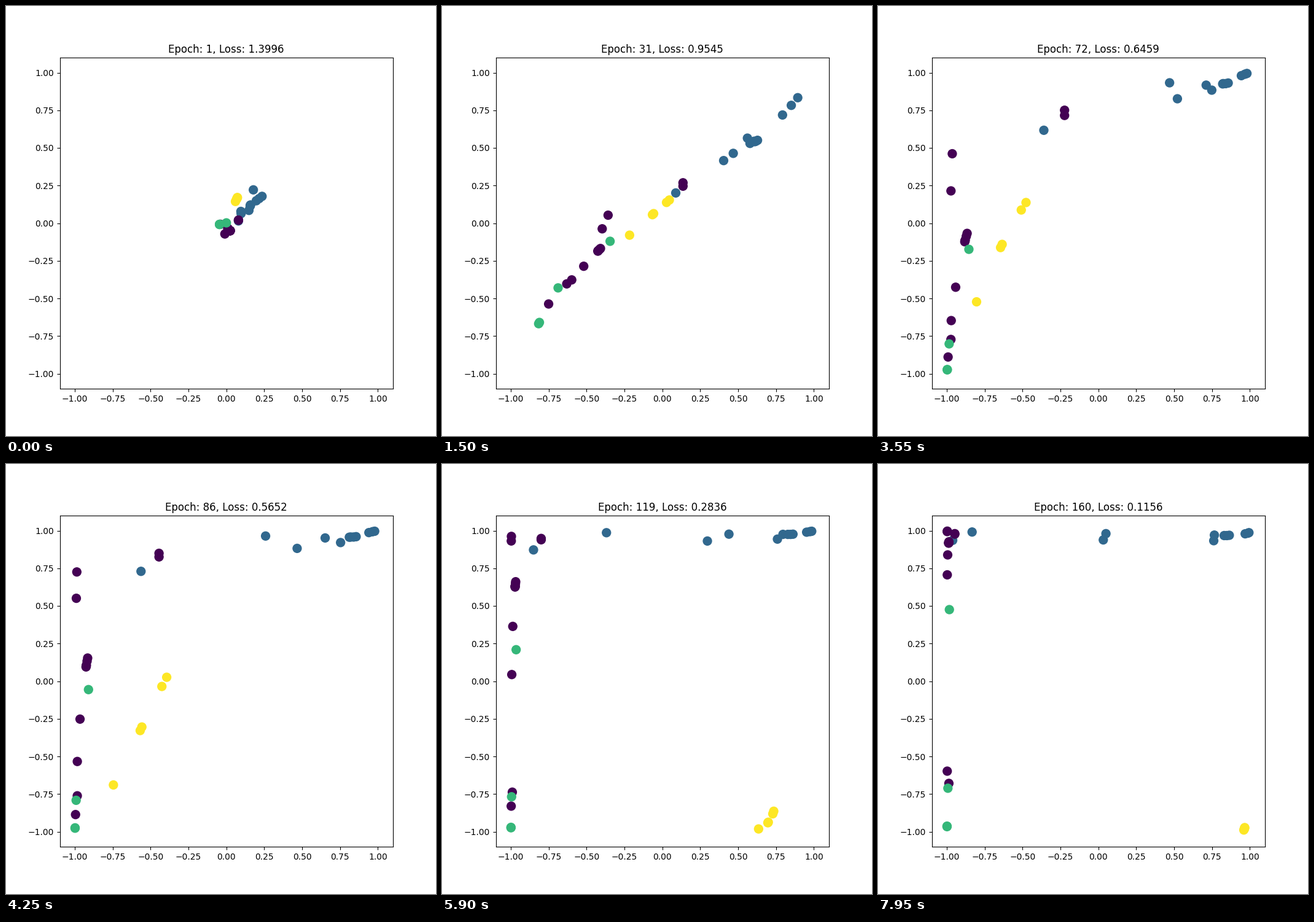
Write a matplotlib script that moves like this. It is 700 by 700 pixels and loops after 8000 ms.

```python
import numpy as np
import matplotlib.pyplot as plt
from matplotlib.animation import FuncAnimation

COUNT, STEP_MS = 160, 50
COLORS = {"yellow": "#fde725", "blue": "#31688e", "purple": "#440154", "green": "#35b779"}

LOSS_EPOCHS = (1, 31, 51, 72, 99, 119, 160)
LOSS = np.array([1.3996, 0.9545, 0.7767, 0.6459, 0.4769, 0.2836, 0.1156])

# Leading nodes: (x, y) before the tanh at a few key epochs.
# All other nodes follow from these.
KEY_EPOCHS = (1, 31, 51, 99, 160)
LEADERS = {
    "far": [(0.24, 0.18), (1.44, 1.2), (2.12, 2.33), (2.28, 3.2), (2.9, 2.5)],
    "mid": [(0.16, 0.12), (0.72, 0.61), (1.09, 1.14), (1.22, 2.1), (1.25, 2.05)],
    "near": [(0.15, 0.085), (0.66, 0.59), (0.9, 1.09), (0.67, 2.05), (0.05, 2.3)],
    "leaf": [(0.18, 0.225), (0.635, 0.64), (0.71, 1.15), (0.03, 2.25), (-1.2, 2.7)],
    "bridge": [(0.08, 0.02), (0.137, 0.275), (0.046, 0.58), (-0.71, 1.49), (-1.81, 2.3)],
    "climb": [(0.01, -0.035), (-0.375, 0.053), (-1.165, 0.088), (-2.9, 1.31), (-3.3, 3.2)],
    "core": [(0.025, -0.05), (-0.434, -0.17), (-0.9, -0.244), (-1.77, 0.376), (-2.5, 1.63)],
    "low": [(-0.01, -0.072), (-0.975, -0.6), (-2.03, -1.19), (-3.3, -1.36), (-3.4, -0.69)],
    "side": [(-0.045, -0.008), (-0.845, -0.46), (-1.77, -0.944), (-2.95, -1.05), (-2.85, -0.89)],
    "loner": [(0, 0.002), (-0.36, -0.121), (-0.837, -0.243), (-1.74, 0.05), (-2.4, 0.517)],
}

# The yellow pair turns sharply, so it has its own key epochs
TURN_EPOCHS = (1, 31, 72, 99, 119, 160)
TURNERS = {
    "outer": [(0.06, 0.145), (-0.22, -0.08), (-1.11, -0.58), (-0.55, -1.245),
              (0.75, -2.35), (1.95, -2.6)],
    "inner": [(0.073, 0.172), (0.046, 0.155), (-0.52, 0.138), (-0.105, -0.26),
              (0.94, -1.31), (2.03, -2.15)],
}


def spline(epochs, keys, epoch):
    """Cubic Hermite curve through keys, with gentler ends."""
    keys = np.asarray(keys, float)
    slopes = np.gradient(keys, epochs, axis=0)
    slopes[0] *= 0.3
    slopes[-1] *= 0.5
    i = min(np.searchsorted(epochs, epoch, side="right"), len(epochs) - 1) - 1
    span = epochs[i + 1] - epochs[i]
    s = (epoch - epochs[i]) / span
    rise = s * s * (3 - 2 * s)
    return (keys[i] * (1 - rise) + keys[i + 1] * rise
            + span * s * (1 - s) * (slopes[i] * (1 - s) - slopes[i + 1] * s))


def layout(epoch):
    """Node positions by colour, in drawing order."""
    lead = {k: spline(KEY_EPOCHS, v, epoch) for k, v in LEADERS.items()}
    lead |= {k: spline(TURN_EPOCHS, v, epoch) for k, v in TURNERS.items()}
    s = min(epoch / 85, 1)
    spread = s * s * (3 - 2 * s)

    def mix(a, b, u):
        return lead[a] * (1 - u) + lead[b] * u

    def beside(name, dx, dy, scale=(1, 1)):
        return lead[name] * scale + spread * np.array([dx, dy])

    nodes = {
        "yellow": [mix("outer", "inner", u) for u in (0, 0.58, 0.61, 0.93, 1)],
        "blue": [
            *(mix("far", "mid", u) for u in (0, 0.25, 0.5, 1)),
            *(mix("mid", "near", u) for u in (0.2, 1)),
            beside("mid", 0.06, 0.03),
            beside("mid", -0.06, 0),
            beside("mid", 0.25, 0.35, (0.6, 0.65)),
            beside("near", 0, 0, (0.65, 0.75)),
            beside("bridge", -0.16, 0, (1, 0.74)),
            lead["leaf"],
        ],
        "purple": [
            lead["bridge"], beside("bridge", 0, -0.08),
            lead["climb"], beside("climb", -0.15, -0.3),
            *(beside("core", -0.07 * k, -0.06 * k) for k in (0, 0.35, 0.8, 0.9, 1)),
            *(beside("core", -0.85 * k, -0.75 * k) for k in (0.55, 1)),
            beside("side", 0, 0, (0.88, 0.93)),
            lead["low"],
        ],
        "green": [
            lead["side"], lead["loner"],
            beside("side", -1, -1.15), beside("side", -0.95, -1.1),
        ],
    }
    return {name: np.tanh(points) for name, points in nodes.items()}


start = layout(1)
fig, ax = plt.subplots(figsize=(7, 7), dpi=100)
ax.set_xlim(-1.1, 1.1)
ax.set_ylim(-1.1, 1.1)
dots = ax.scatter(*np.vstack(list(start.values())).T, s=100,
                  c=[COLORS[name] for name in start for _ in start[name]])
title = ax.set_title("")


def update(frame):
    epoch = frame + 1
    dots.set_offsets(np.vstack(list(layout(epoch).values())))
    title.set_text(f"Epoch: {epoch}, Loss: {spline(LOSS_EPOCHS, LOSS, epoch):.4f}")
    return dots, title


anim = FuncAnimation(fig, update, frames=COUNT, interval=STEP_MS,
                     repeat=True, repeat_delay=0)
plt.show()
```
